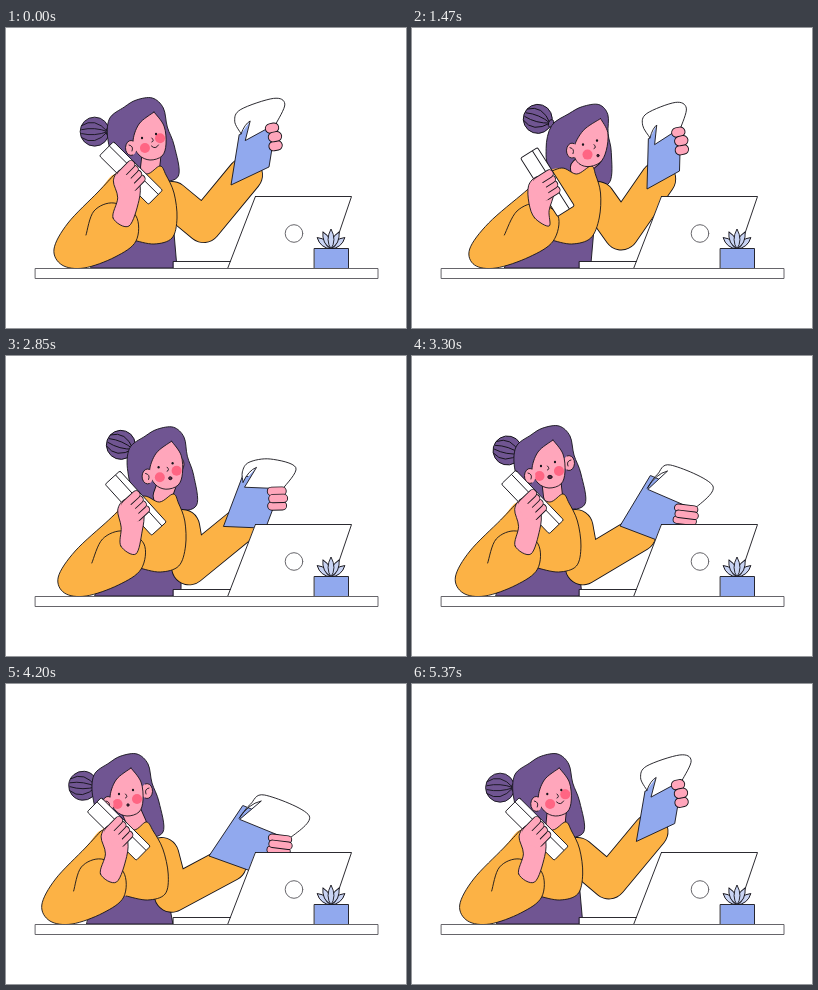
Animation, 400 px wide and 300 px high, one loop 5400 ms. Source, as an HTML page with a canvas:

```html
<!DOCTYPE html>
<html lang="en">
<head>
<meta charset="utf-8">
<title>Phone call at the desk</title>
<style>
html, body { margin: 0; width: 100%; height: 100%; overflow: hidden; background: #fff; }
canvas { display: block; width: 400px; height: 300px; }
</style>
</head>
<body>
<canvas id="stage"></canvas>
<script>
const LOOP = 5400;
const TIMES = [0, 780, 1470, 2340, 3300, 4200];
const INK = '#15131a', GREY = '#55545a', ORANGE = '#fcb245', PURPLE = '#705592',
  PINK = '#ffa6bb', BLUSH = '#ff6583', BLUE = '#91a9ee', LEAF = '#c9d4f4', WHITE = '#fff';

// One value per key time; everything else follows from these.
const MOVES = {
  lean: [0, 23, 24, 27, -3, -13],          // shoulders
  sway: [0, 5, 6, 8, -5, -12],             // resting elbow
  headX: [144, 171, 179, 182, 137, 121],
  tilt: [0, .05, .33, .4, .25, .08],
  turn: [.6, 1, 1, 1, -.5, -.5],           // 1 looks at the pad, below 0 at us
  drop: [0, 10, 9, 4, 1, 0],               // phone away from the ear
  padX: [225, 247, 235, 229, 208, 203],
  padY: [157, 138, 161, 171, 170, 172],
  low: [0, 0, 0, 0, 1, 1],                 // pad laid towards the laptop
  talk: [0, .4, .5, .5, .9, .5]
};

// Shapes in the first pose
const TORSO = [[127,212], [148,216], [166,210], [171,190], [168,165], [160,147],
  [154,138], [141,146], [125,140], [108,147], [90,182], [100,205]];
const SLEEVE = [[108,147], [92,164], [62,195], [48,221], [56,237], [78,240],
  [109,229], [130,213], [130,188], [108,175], [88,183], [80,207]];
const SKIRT = [[93,213], [168,205], [171,240], [85,240]];
// Around the middle of the face
const HAIR = [[-32,24], [-42,2], [-41,-21], [-26,-33], [-14,-40], [2,-42],
  [13,-32], [17,-13], [24,6], [28,36], [6,40]];
const FACE = [[4,-28], [-11,-16], [-17,2], [-11,15], [0,20], [12,16], [16,4], [14,-14], [4,-28]];
// Along and across the phone
const PALM = [[8,27], [-7,18], [-10,6], [0,-1], [13,1], [25,14]];
// Across and up the pad
const SHEET_UP = [[.05,1.05], [-.19,1.4], [-.07,1.6], [.81,1.5], [1.16,1.25], [1,.9], [.2,.85]];
const SHEET_LOW = [[.08,.82], [.08,.92], [.11,1.12], [.24,1.36], [1.18,1.28], [1.1,.76], [.1,.8]];
const FOLD = [.25, 1.24];

const canvas = document.getElementById('stage');
const ctx = canvas.getContext('2d');
const dpr = window.devicePixelRatio || 1;
canvas.width = 400 * dpr;
canvas.height = 300 * dpr;

const mix = (a, b, u) => a + (b - a) * u;

// Periodic monotone cubic through the key values
function track(values) {
  const n = TIMES.length;
  const span = i => (TIMES[(i + 1) % n] - TIMES[i] + LOOP) % LOOP;
  const rate = i => (values[(i + 1) % n] - values[i]) / span(i);
  const slopes = values.map((_, i) => {
    const a = rate((i + n - 1) % n), b = rate(i);
    return a * b <= 0 ? 0 : 2 * a * b / (a + b);
  });
  return t => {
    let i = n - 1;
    while (TIMES[i] > t) i--;
    const j = (i + 1) % n, h = span(i), u = (t - TIMES[i]) / h, w = 1 - u;
    return values[i] * (1 + 2 * u) * w * w + values[j] * u * u * (3 - 2 * u) +
      h * u * w * (w * slopes[i] - u * slopes[j]);
  };
}
const tracks = Object.entries(MOVES).map(([name, values]) => [name, track(values)]);

// Adds a smooth curve through the points
function curve(pts, closed) {
  const n = pts.length;
  const at = i => closed ? pts[(i + n) % n] : pts[Math.max(0, Math.min(n - 1, i))];
  ctx.moveTo(...pts[0]);
  for (let i = 0; i < (closed ? n : n - 1); i++) {
    const [a, b, c, d] = [at(i - 1), at(i), at(i + 1), at(i + 2)];
    ctx.bezierCurveTo(b[0] + (c[0] - a[0]) / 6, b[1] + (c[1] - a[1]) / 6,
      c[0] - (d[0] - b[0]) / 6, c[1] - (d[1] - b[1]) / 6, ...c);
  }
}

function paint(fill, build, line = true) {
  ctx.beginPath();
  build();
  if (fill) { ctx.fillStyle = fill; ctx.fill(); }
  if (line) ctx.stroke();
}

const blob = (pts, fill, line) => paint(fill, () => curve(pts, true), line);

function poly(pts, fill, line) {
  paint(fill, () => {
    pts.forEach(p => ctx.lineTo(...p));
    ctx.closePath();
  }, line);
}

const oval = (x, y, rx, ry, fill, line) =>
  paint(fill, () => ctx.ellipse(x, y, rx, ry, 0, 0, 7), line);

const bend = (from, control, to) => paint(null, () => {
  ctx.moveTo(...from);
  ctx.quadraticCurveTo(...control, ...to);
});

// Thick outlined line with round ends
function tube(pts, width, fill) {
  ctx.save();
  for (const [w, color] of [[width + .9, INK], [width - .9, fill]]) {
    ctx.lineWidth = w;
    ctx.strokeStyle = color;
    paint(null, () => pts.forEach(p => ctx.lineTo(...p)));
  }
  ctx.restore();
}

function within(x, y, angle, draw) {
  ctx.save();
  ctx.translate(x, y);
  ctx.rotate(angle);
  draw();
  ctx.restore();
}

// Works out all joints from the pose values.
function rig(p) {
  p.nod = p.tilt * Math.max(0, p.turn);
  p.headY = 112 + 20 * p.nod;
  p.body = ([x, y]) => [x + p.lean * (1 - (y - 145) * .0072), y];
  p.rest = ([x, y]) => [x + mix(p.sway, p.lean, (240 - y) / 93), y];
  p.head = ([x, y]) => [p.headX + x - y * .6 * p.nod, p.headY + y];

  p.phone = [125 + mix(p.sway, p.lean, .25), 145 + p.drop];
  p.phoneAngle = .78 + .025 * p.drop;

  const across = [38 - .55 * (p.padX - 225), mix(-18, 18, p.low)];
  const up = [-.65 * (p.padX - 237) + 10 * p.low, -48];
  p.pad = ([a, c]) => [0, 1].map(i => [p.padX, p.padY][i] + a * across[i] + c * up[i]);
  return p;
}

// Two-bone arm from the shoulder to the pad
function drawReach(p) {
  const upper = 41, fore = 65;
  const [sx, sy] = p.body([166, 171]), [mx, my] = p.pad([.5, 0]);
  const cx = mx - 5, cy = my - 1, d = Math.hypot(cx - sx, cy - sy);
  const cos = (upper * upper + d * d - fore * fore) / (2 * upper * d);
  const angle = Math.atan2(cy - sy, cx - sx) + Math.acos(Math.max(-1, Math.min(1, cos)));
  const elbow = [sx + upper * Math.cos(angle), sy + upper * Math.sin(angle)];
  tube([[sx, sy], elbow, [cx, cy]], 35, ORANGE);
}

function drawBun(p) {
  const r = 50 + 10 * p.turn, a = .15 + p.tilt;
  within(p.headX - r * Math.cos(a), p.headY - r * Math.sin(a), p.tilt, () => {
    oval(0, 0, 14.5, 14.5, PURPLE);
    for (const b of [-15, -5, 5, 15]) bend([13, 0], [0, b], [-13, b * .4]);
    oval(14, 0, 2.5, 4, PURPLE);
  });
}

function drawBody(p) {
  const torso = TORSO.map(p.body), [nx, ny] = torso[7];
  blob(HAIR.map(([x, y]) => p.head([x + 4.5 - 7 * p.turn, y])), PURPLE);
  tube([[p.headX + 2, p.headY + 10], [nx + 3, ny - 6]], 19, PINK);
  poly(SKIRT.map(p.body), PURPLE);
  drawReach(p);
  blob(torso, ORANGE, false);
  paint(null, () => curve(torso.slice(0, 10)));
}

// Ear open towards the face; side is -1 on the left
function drawEar(x, y, side) {
  const middle = side < 0 ? Math.PI : 0;
  oval(x, y, 5.5, 7.5, PINK, false);
  paint(null, () => ctx.ellipse(x, y, 5.5, 7.5, 0, middle - 1.9, middle + 1.9));
  bend([x + side * 2, y - 3], [x - side * 3, y - 2], [x - side, y + 3]);
}

function drawFace(p) {
  const outline = FACE.map(p.head);
  const { turn, talk } = p;
  within(p.headX, p.headY, 0, () => drawEar(14 - 12 * turn, -5, 1));
  paint(PINK, () => curve(outline));
  ctx.save();
  ctx.clip();
  within(p.headX, p.headY, 0, () => {
    const far = 5 * Math.min(1, Math.max(0, (1 - turn) * 2.5));
    oval(-7.5 + 4 * turn, 8, 5, 5, BLUSH, false);
    oval(10, 3 - 8 * Math.max(0, turn), far, far, BLUSH, false);
  });
  ctx.restore();
  within(p.headX, p.headY, 0, () => {
    oval(-8, -2, 1.1, 1.3, INK, false);
    oval(6, -6, 1.1, 1.3, INK, false);
    bend([turn * 3, -2], [turn * 3 + 3, 1], [turn * 3, 2]);
    const x = 3 + 4 * turn, y = 9;
    if (talk > .2) oval(x, y, .6 + 2 * talk * talk, .8 + talk, '#5c2440');
    else bend([x - 4, y - 3], [x, y + 1], [x + 3, y - 4]);
    drawEar(-19, 8 - 12 * p.nod, -1);
  });
}

function drawPhoneHand(p) {
  const sleeve = SLEEVE.map(p.rest), [x, y] = p.phone, angle = p.phoneAngle;
  const c = Math.cos(angle), s = Math.sin(angle);
  const place = ([u, v]) => [x + u * c - v * s, y + u * s + v * c];
  blob(sleeve.slice(0, 10), ORANGE, false);
  paint(null, () => curve(sleeve));
  within(x, y, angle, () => {
    paint(WHITE, () => ctx.roundRect(-34.5, -10, 69, 20, 1.5));
    bend([-34, -4], [0, -4], [34, -4]);
  });
  blob([p.rest([107, 190]), ...PALM.map(place), p.rest([123, 198])], PINK);
  within(x, y, angle, () => {
    for (let i = 3; i >= 0; i--) {
      const u = -6 + i * 5.8;
      tube([[u, 8], [u, i - 6]], 7.8, PINK);
    }
    oval(3, 10, 12, 6, PINK, false);
  });
}

function drawPad(p) {
  const sheet = SHEET_UP.map((q, i) => p.pad(q.map((v, k) => mix(v, SHEET_LOW[i][k], p.low))));
  const hinge = sheet[0], corner = sheet[6], fold = p.pad(FOLD);
  poly([[0, 1.05], [0, 0], [1, 0], [1, 1]].map(p.pad), BLUE);
  poly([hinge, fold, corner], BLUE, false);
  paint(WHITE, () => {
    curve(sheet.slice(0, 6));
    ctx.lineTo(...corner);
    ctx.lineTo(...fold);
    ctx.quadraticCurveTo(mix(hinge[0], fold[0], .4), fold[1] + 3, ...hinge);
  });
  const length = mix(4, 16, p.low), gap = mix(9, 6, p.low);
  within(...p.pad([1.03, .62]), mix(-.2, .12, p.low), () => {
    for (const i of [1, -1, 0]) {
      const inset = -Math.abs(i) * 1.2;
      tube([[inset - length / 2, i * gap], [inset + length / 2, i * gap]], mix(9.5, 7.5, p.low), PINK);
    }
  });
}

function drawDesk() {
  paint(WHITE, () => ctx.rect(167.5, 233.5, 60, 7));
  poly([[249, 168.5], [345.5, 168.5], [321, 240.5], [222, 240.5]], WHITE);
  for (const i of [-2, 2, -1, 1, 0]) {
    within(325, 221, i * .44, () => paint(LEAF, () => {
      const tip = Math.abs(i) - 20;
      ctx.moveTo(0, 0);
      ctx.quadraticCurveTo(-6, -9, 0, tip);
      ctx.quadraticCurveTo(6, -9, 0, 0);
    }));
  }
  paint(BLUE, () => ctx.rect(308.5, 220.5, 34, 20));
  ctx.strokeStyle = GREY;
  oval(288, 205.5, 8.8, 8.8, WHITE);
  paint(WHITE, () => ctx.rect(29.5, 240.5, 342.5, 10));
}

function render(now) {
  const t = now % LOOP;
  const pose = rig(Object.fromEntries(tracks.map(([name, at]) => [name, at(t)])));
  ctx.setTransform(dpr, 0, 0, dpr, 0, 0);
  ctx.fillStyle = WHITE;
  ctx.fillRect(0, 0, 400, 300);
  ctx.lineWidth = .9;
  ctx.strokeStyle = INK;
  ctx.lineCap = ctx.lineJoin = 'round';
  for (const draw of [drawBun, drawBody, drawFace, drawPhoneHand, drawPad, drawDesk]) draw(pose);
}

const start = performance.now();
function tick() {
  render(performance.now() - start);
  requestAnimationFrame(tick);
}
tick();
</script>
</body>
</html>
```
